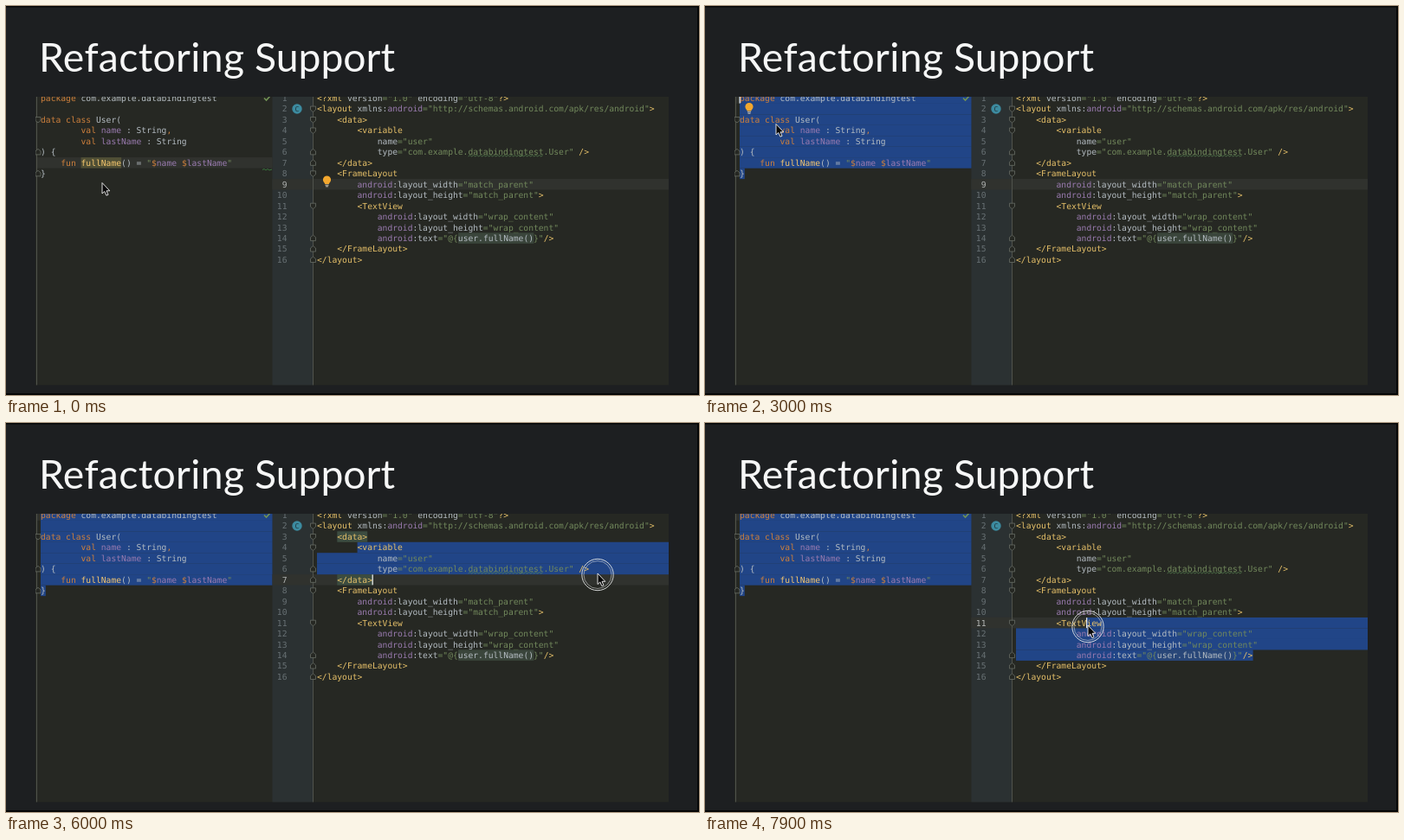
Animation, 800 px wide and 450 px high, one loop 8 s. Source, as an HTML page:

```html
<!DOCTYPE html>
<html lang="en">
<head>
<meta charset="utf-8">
<title>Refactoring Support</title>
<style>
  html, body { margin: 0; width: 100%; height: 100%; overflow: hidden; background: #1d1f21; }
  svg { display: block; width: 800px; height: 450px; }
  .code text { font: 9.67px "DejaVu Sans Mono", monospace; white-space: pre; text-rendering: geometricPrecision; }
  .title { font: 46.3px Lato, sans-serif; fill: #f6f7f7; }
</style>
</head>
<body>
<svg viewBox="0 0 800 450">
  <rect width="800" height="450" fill="#1d1f21"/>
  <path d="M0 .5H800M0 449H800M799 0V450" stroke="#050606" stroke-width="2"/>
  <text class="title" y="76"><tspan x="38" letter-spacing=".35">Refactoring</tspan><tspan x="287">Support</tspan></text>
  <clipPath id="pane"><rect x="34" y="105" width="731" height="333.5"/></clipPath>
  <g class="code" clip-path="url(#pane)">
    <rect x="34" y="105" width="731" height="334" fill="#262823"/>
    <rect x="307.5" y="105" width="47" height="334" fill="#2b3132"/>
    <g id="under"></g>
    <path d="M35.5 105V439M354.5 105V439" stroke="#50534c" stroke-width="1"/>
    <g id="lines"></g>
    <g id="over"></g>
  </g>
  <g id="pointer">
    <g id="press" fill="none" stroke="#e4e6e6">
      <circle cy="1" r="18.2" stroke-width=".9"/>
      <circle cy="1" r="16" stroke-width=".7" opacity=".75"/>
    </g>
    <path d="M0 -.5V12L2.8 9.5 4.9 14.2 7 13.3 5 8.8H8.8Z" fill="#080808" stroke="#f2f2f2" stroke-width=".9"/>
  </g>
</svg>
<script>
const LOOP = 8000, STEP = 100, CHAR = 5.822, ROW = 12.46;
const $ = id => document.getElementById(id);
const C = {
  text: '#b4bcc2', keyword: '#cc7f3c', tag: '#e6c069', string: '#72895c',
  field: '#9a7bb0', func: '#f5c66e', select: '#214587', line: '#30322e'
};

const kotlin = {
  x: 40, right: 307.5, lineLeft: 36,
  rule: /(\b(?:package|data|class|val|fun)\b|[$,])|(fullName)|(")|(\b(?:name|lastName)\b)/g,
  colors: [C.keyword, C.func, C.string, C.field],
  lines: [
    'package com.example.databindingtest', '', 'data class User(',
    '        val name : String,', '        val lastName : String', ') {',
    '    fun fullName() = "$name $lastName"', '}'
  ]
};
const xml = {
  x: 359, right: 765, lineLeft: 307.5,
  rule: /(<\/?\w+|<\?xml|\?>|\/?>)|(="@\{|\}"|="[^"@]*")|(android(?=[:=]))/g,
  colors: [C.tag, C.string, C.field],
  lines: [
    '<?xml version="1.0" encoding="utf-8"?>',
    '<layout xmlns:android="http://schemas.android.com/apk/res/android">',
    '    <data>', '        <variable', '            name="user"',
    '            type="com.example.databindingtest.User" />', '    </data>',
    '    <FrameLayout', '        android:layout_width="match_parent"',
    '        android:layout_height="match_parent">', '        <TextView',
    '            android:layout_width="wrap_content"',
    '            android:layout_height="wrap_content"',
    '            android:text="@{user.fullName()}"/>', '    </FrameLayout>', '</layout>'
  ]
};

// Times, then anchor row/column, caret row/column, optional drawn caret column
const kotlinSelection = [
  [0, 0, 0, 7, 0], [1100, 8, 1, 8, 1], [1400, 8, 1, 7, 5], [1500, 8, 1, 7, 6],
  [1600, 8, 1, 6, 3], [1700, 8, 1, 5, 6], [1800, 8, 1, 4, 5], [1900, 8, 1, 2, 0], [2100, 8, 1, 1, 0]
];
const xmlSelection = [
  [0, 0, 0, 9, 0], [4800, 4, 8, 4, 8], [5100, 4, 8, 4, 12], [5300, 4, 8, 5, 23],
  [5500, 4, 8, 6, 48], [5700, 4, 8, 6, 54], [5900, 4, 8, 7, 0, 11], [6300, 4, 8, 6, 54],
  [7300, 14, 47, 14, 47], [7500, 14, 47, 14, 42], [7600, 14, 47, 14, 35],
  [7700, 14, 47, 13, 28], [7800, 14, 47, 12, 21], [7900, 14, 47, 11, 14]
];
const path = [
  [0, 111, 205], [100, 111, 205], [400, 68, 199], [600, 49, 194], [1100, 49, 194],
  [1300, 55, 187], [1500, 67, 175.5], [1700, 74, 150], [1900, 62, 122], [2100, 45, 110],
  [2500, 42, 110], [2800, 71, 130], [3000, 82, 137], [3300, 210, 152], [3700, 372, 152],
  [4300, 398, 145], [4800, 405, 144], [5000, 437, 150], [5200, 506, 157], [5600, 636, 169],
  [6000, 683, 174.5], [6300, 676, 170], [6500, 674, 170], [6700, 652, 220], [6900, 633.5, 264.5],
  [7100, 632, 267], [7300, 632, 267], [7500, 600, 262], [7700, 520, 250], [7900, 442, 234.5]
];

const mid = row => 106.6 + (row - 1) * ROW;
const within = (t, a, b) => t >= a && t < b;
const rect = (x, y, w, h, fill) => `<rect x="${x}" y="${y}" width="${w}" height="${h}" fill="${fill}"/>`;
const escapeText = s => s.replace(/&/g, '&amp;').replace(/</g, '&lt;').replace(/>/g, '&gt;');
const label = (x, row, content, extra = '') => `<text x="${x}" y="${mid(row) + 3.4}" ${extra}>${content}</text>`;
const span = (pane, row, col, count, fill) =>
  rect(pane.x + col * CHAR, mid(row) - ROW / 2, count * CHAR, ROW, fill);

function highlight(pane, line) {
  let out = '', last = 0;
  for (const m of line.matchAll(pane.rule)) {
    const kind = m.slice(1).findIndex(Boolean);
    out += escapeText(line.slice(last, m.index)) + `<tspan fill="${pane.colors[kind]}">${escapeText(m[0])}</tspan>`;
    last = m.index + m[0].length;
  }
  return out + escapeText(line.slice(last));
}

function fold(x, row, closing) {
  const flip = closing ? -1 : 1;
  return `<path transform="translate(${x} ${mid(row)}) scale(1 ${flip})" d="M-3-3H3V1L0 3.5-3 1Z" fill="#262823" stroke="#686c65" stroke-width=".8"/>`;
}

function drawStatic() {
  let out = '';
  for (const pane of [kotlin, xml])
    pane.lines.forEach((line, i) => out += label(pane.x, i + 1, highlight(pane, line), `fill="${C.text}"`));
  for (const row of [2, 3, 4, 8, 11]) out += fold(354.5, row);
  for (const row of [6, 7, 14, 15, 16]) out += fold(354.5, row, true);
  out += fold(37, 3) + fold(37, 6, true) + fold(37, 8, true);
  out += `<circle cx="336" cy="119" r="5.7" fill="#3c8ba0"/><text x="336" y="122" text-anchor="middle" fill="#20343b" style="font-size:8px">C</text>`;
  let wave = 'M533.7 174';
  for (let i = 1; i <= 43; i++) wave += `L${533.7 + i * 2} ${174 - (i % 2) * 1.4}`;
  out += `<path d="${wave}" fill="none" stroke="#5b8a55" stroke-width=".7"/>`;
  out += '<path d="M298 106.5L300.5 109 305 104" fill="none" stroke="#729356" stroke-width="1.6"/>';
  $('lines').innerHTML = out;
}

const current = (keys, t) => keys.filter(k => k[0] <= t).pop();

function selection(pane, [, aRow, aCol, row, col]) {
  let out = rect(pane.lineLeft, mid(row) - ROW / 2, pane.right - pane.lineLeft, ROW, C.line);
  if (!aRow) return out;
  const [from, to] = [[aRow, aCol], [row, col]].sort((a, b) => a[0] - b[0] || a[1] - b[1]);
  for (let r = from[0]; r <= to[0]; r++) {
    const x1 = pane.x + (r === from[0] ? from[1] * CHAR : 0);
    const x2 = r === to[0] ? pane.x + to[1] * CHAR : pane.right;
    out += rect(x1, mid(r) - ROW / 2, x2 - x1, ROW + .1, C.select);
  }
  return out;
}

const caret = (pane, [, , , row, col, drawn = col]) =>
  rect(pane.x + drawn * CHAR - .5, mid(row) - 6, 1.3, 12, '#e8eaea');

const bulb = (x, y) => `<g transform="translate(${x} ${y})"><path d="M-2.3 3C-2.3 1.5-4.6.7-4.6-2A4.6 4.6 0 0 1 4.6-2C4.6.7 2.3 1.5 2.3 3Z" fill="#f2a72e"/><path d="M-2 4.2H2M-1.5 5.8H1.5" stroke="#c9c4b4" stroke-width="1"/></g>`;

function pointerAt(t) {
  const i = path.findIndex(k => k[0] > t);
  if (i < 0) return path[path.length - 1].slice(1);
  const [a, b] = [path[i - 1], path[i]], p = (t - a[0]) / (b[0] - a[0]);
  return [a[1] + (b[1] - a[1]) * p, a[2] + (b[2] - a[2]) * p];
}

function render(t) {
  const left = current(kotlinSelection, t), right = current(xmlSelection, t);
  const tagColor = '#3c4c40';
  let under = selection(kotlin, left);
  if (t < 1100) under += span(kotlin, 7, 8, 8, '#504f35');
  if (within(t, 1100, 1900)) under += span(kotlin, 6, 2, 1, '#3b514d') + span(kotlin, 8, 0, 1, '#3b514d');
  under += selection(xml, right);
  under += span(xml, 14, 28, 15, t < 7600 ? '#3a453b' : '#294778');
  if (within(t, 4800, 5500)) under += span(xml, 8, 4, 12, tagColor) + span(xml, 15, 4, 14, tagColor);
  if (within(t, 5900, 6300)) under += span(xml, 3, 4, 6, tagColor) + span(xml, 7, 4, 7, tagColor);
  $('under').innerHTML = under;

  let over = '';
  for (let row = 1; row <= 16; row++)
    over += label(324.5, row, row, `text-anchor="end" fill="${row === right[3] ? '#b3b6b4' : '#687174'}"`);
  if (within(t, 1100, 1900)) {
    const bold = 'fill="#ffef28" font-weight="bold" style="font-weight:bold"';
    over += label(kotlin.x + 2 * CHAR, 6, '{', bold) + label(kotlin.x, 8, '}', bold);
  }
  if (t < 1900) over += '<path d="M296 189.5L298 188.5 300 190 302 188.5 304 190 307 189" fill="none" stroke="#39733d" stroke-width="1"/>';
  if (within(t, 1100, 4700)) over += caret(kotlin, left);
  if (t >= 4800) over += caret(xml, right);
  if (t < 800) over += bulb(370.5, 203);
  if (within(t, 2800, 4700)) over += bulb(51, 118.5);
  if (within(t, 6800, 7300)) over += bulb(370.5, 166);
  $('over').innerHTML = over;

  const [x, y] = pointerAt(t);
  $('pointer').setAttribute('transform', `translate(${x} ${y})`);
  const pressed = within(t, 1100, 2500) || within(t, 4800, 6500) || t >= 7300;
  $('press').setAttribute('visibility', pressed ? 'visible' : 'hidden');
}

drawStatic();
const start = performance.now();
function tick() {
  const t = (performance.now() - start) % LOOP;
  render(Math.floor(t / STEP) * STEP);
  requestAnimationFrame(tick);
}
tick();
</script>
</body>
</html>
```
